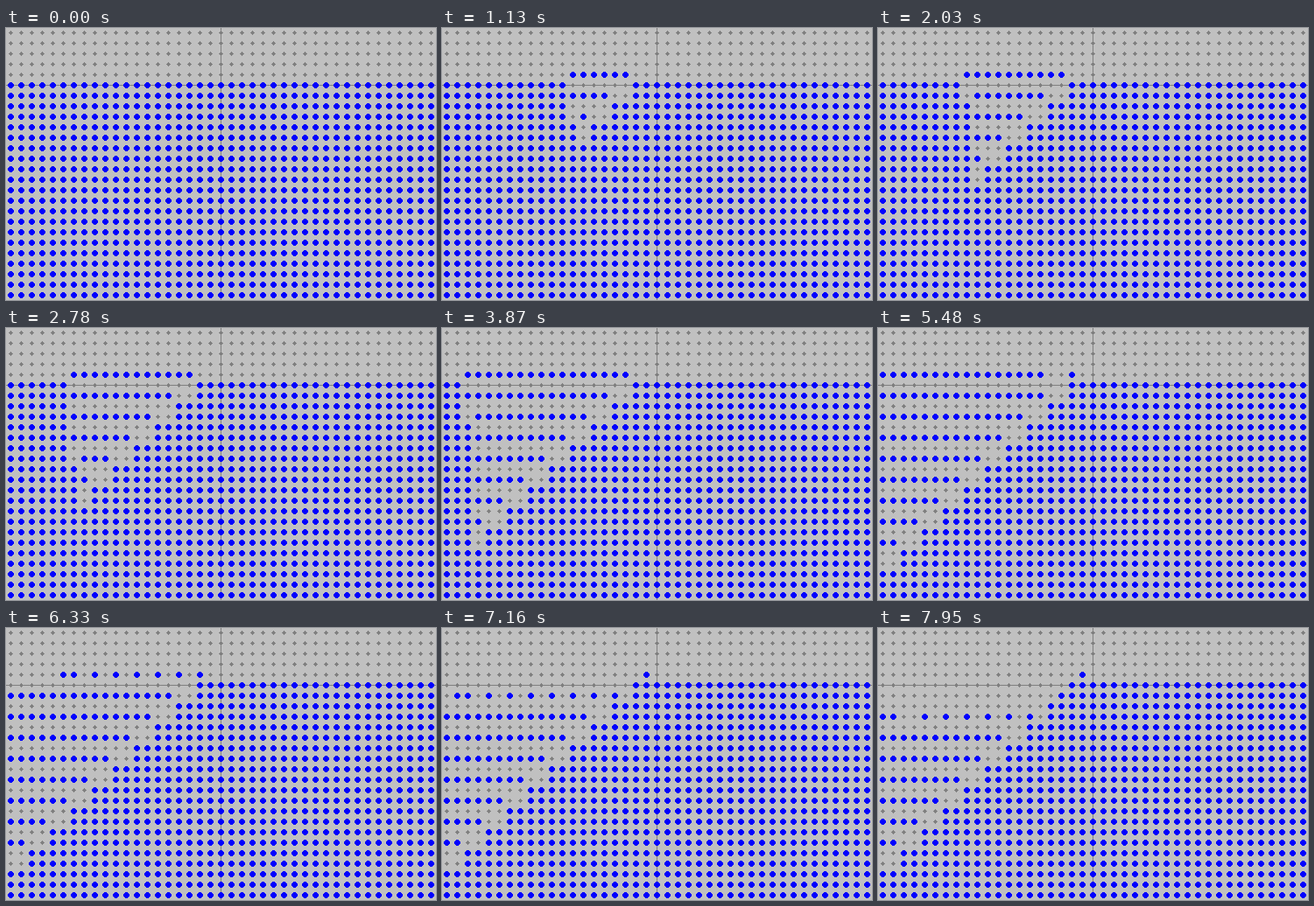
Recreate the animation shown at these times as an HTML page. Size 491 by 311 pixels, loop 8 s.

```html
<!DOCTYPE html>
<html lang="en">
<head>
<meta charset="utf-8">
<title>Peg army</title>
<style>
  html, body { margin: 0; width: 100%; height: 100%; overflow: hidden; background: #c0c0c0; }
  svg { display: block; }
</style>
</head>
<body>
<svg width="491" height="311" viewBox="0 0 491 311" shape-rendering="crispEdges">
  <rect width="491" height="311" fill="#c0c0c0"/>
  <path fill="#808080" d="M245 0h1v311h-1zM0 65h491v1h-491z"/>
  <path id="holes" fill="#808080"/>
  <path id="pegs" fill="#0000ff"/>
</svg>
<script>
const LOOP = 8000, COLS = 41, ROWS = 26, FRONT = 5;
const HOLE = 'h1v1h1v1h1v1h-1v1h-1v1h-1v-1h-1v-1h-1v-1h1v-1h1z';
const PEG = 'h3v1h1v1h1v3h-1v1h-1v1h-3v-1h-1v-1h-1v-3h1v-1h1z';
const pos = i => 5 + 12 * i;
const tick = t => Math.floor(t / 10) * 10;

// Delay between the opening jumps: [jump index, ms]
const PACE = [[0, 64.7], [27, 57.35], [43, 47], [63, 35.4], [89, 20.6]];

function openingTime(n) {
  let t = 500;
  for (let k = 1; k < PACE.length; k++) {
    const [a, da] = PACE[k - 1], [b, db] = PACE[k];
    const u = Math.min(n, b) - a;
    if (u <= 0) break;
    t += u * da + (db - da) / (b - a) * u * u / 2;
  }
  return t;
}

const jumps = [];
const jump = (t, x, y, dx, dy) => jumps.push({ t: tick(t), x, y, dx, dy });

// Every column climbs two rows, from right to left
let n = 0;
for (let x = 17; x >= 0; x--) {
  const count = 9 - Math.floor(x / 2);
  for (let k = 0; k < count; k++) jump(openingTime(n++), x, 6 + 2 * k, 0, -1);
}

// A row spreads out to every other hole, then one peg hops along it
function sweep(row, last, spreadAt, hopAt) {
  for (let x = last - 1, m = 0; x >= -2; x -= 2, m++)
    jump(spreadAt + 27 * m + 4 * m * m, x, row, 1, 0);
  for (let x = -1, m = 0; x <= last; x += 2, m++)
    jump(hopAt + 98 * m, x, row, 1, 0);
}
sweep(4, 17, 5480, 6116);
sweep(6, 15, 6640, 7164);
sweep(8, 13, 7717, 8200);
jumps.sort((a, b) => a.t - b.t);

function gridPath(shape, ox, oy, test) {
  let d = '';
  for (let y = 0; y < ROWS; y++)
    for (let x = 0; x < COLS; x++)
      if (test(x, y)) d += `M${pos(x) + ox} ${pos(y) + oy}${shape}`;
  return d;
}

function boardAfter(count) {
  const board = Array.from({ length: ROWS }, (_, y) => Array(COLS).fill(y >= FRONT));
  const put = (x, y, on) => { if (x >= 0) board[y][x] = on; };
  for (const { x, y, dx, dy } of jumps.slice(0, count)) {
    put(x, y, false);
    put(x + dx, y + dy, false);
    put(x + 2 * dx, y + 2 * dy, true);
  }
  return board;
}

const pegs = document.getElementById('pegs');
document.getElementById('holes').setAttribute('d', gridPath(HOLE, 0, -2, () => true));

let shown = -1;
function render(t) {
  const count = jumps.filter(j => j.t <= t).length;
  if (count === shown) return;
  shown = count;
  const board = boardAfter(count);
  pegs.setAttribute('d', gridPath(PEG, -1, -3, (x, y) => board[y][x]));
}

const start = performance.now();
function loop() {
  render((performance.now() - start) % LOOP);
  requestAnimationFrame(loop);
}
loop();
</script>
</body>
</html>
```
